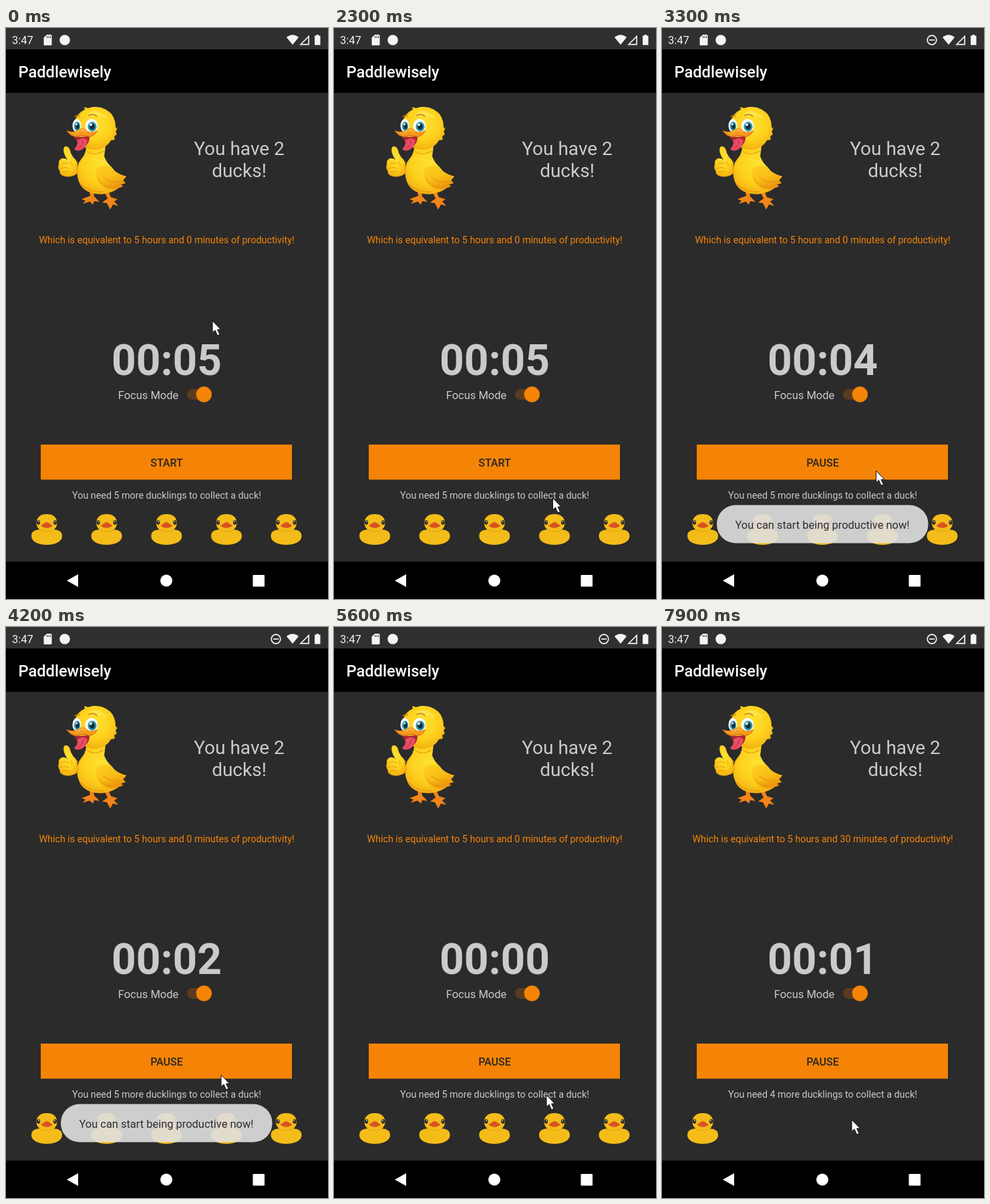
An HTML page for the animation above (8 s loop, 482 px wide and 854 px high).

```html
<!DOCTYPE html>
<html lang="en">
<head>
<meta charset="utf-8">
<title>Focus timer</title>
<style>
html, body { margin: 0; width: 100%; height: 100%; overflow: hidden; background: #2b2b2b; }
svg { display: block; width: 482px; height: 854px; font-family: Roboto, "Liberation Sans", sans-serif; }
.mid { text-anchor: middle; }
</style>
</head>
<body>
<svg viewBox="0 0 482 854">
  <defs>
    <radialGradient id="gold" cx=".5" cy=".38" r=".65">
      <stop offset="0" stop-color="#ffe234"/>
      <stop offset=".6" stop-color="#fdd01c"/>
      <stop offset="1" stop-color="#f4ac12"/>
    </radialGradient>
    <linearGradient id="wing" x1="0" y1="0" x2=".5" y2="1">
      <stop offset="0" stop-color="#fdd221"/>
      <stop offset=".6" stop-color="#f9bd16"/>
      <stop offset="1" stop-color="#ec930c"/>
    </linearGradient>
    <g id="duckling">
      <path fill="#f3bc19" d="M38 760C38 752 44 751 50 750Q45.500 746 45.500 740C46 731 52 727 61 727S76 731 76.500 740Q76.500 746 72 750C78 751 84 752 84 760C84 768 74 773 61 773S38 768 38 760Z"/>
      <path fill="none" stroke="#e3a816" d="M50 750.500Q61 756 72 750.500"/>
      <ellipse cx="48.500" cy="739.500" rx="2.600" ry="3.200" fill="#292522"/>
      <ellipse cx="73.500" cy="739.500" rx="2.600" ry="3.200" fill="#292522"/>
      <circle cx="49" cy="738.500" r=".9" fill="#ddd"/>
      <circle cx="73" cy="738.500" r=".9" fill="#ddd"/>
      <path fill="#df5822" d="M52 744Q56 742 58 740Q61 738 64 740Q66 742 70 744Q66 748 61 748T52 744Z"/>
      <path fill="none" stroke="#b8431c" stroke-width=".8" d="M54 744.500Q61 742.500 68 744.500"/>
    </g>
  </defs>

  <rect width="482" height="854" fill="#2b2b2b"/>
  <rect width="482" height="32" fill="#303030"/>
  <path d="M0 32H482V97H0ZM0 798H482V854H0Z"/>

  <!-- status bar -->
  <g fill="#f4f4f4">
    <text x="9" y="24" font-size="16.500">3:47</text>
    <path d="M61 10H67Q68.500 10 68.500 11.500V24.500Q68.500 26 67 26H58Q56.500 26 56.500 24.500V14.500Z"/>
    <path stroke="#303030" d="M61.500 12V15M64 12V15M66.500 12V15"/>
    <circle cx="88" cy="18" r="7.800"/>
    <path d="M420 14Q429 6.500 438 14L429 25Z"/>
    <path fill-rule="evenodd" d="M439 25.500L454 10.500V25.500ZM443 23.700H452.300V14.500Z"/>
    <path d="M464.500 10H468V11.500H470.500V25.500H462V11.500H464.500Z"/>
  </g>
  <g id="dnd" fill="none" stroke="#f4f4f4" stroke-width="1.700">
    <circle cx="404" cy="18" r="6.800"/>
    <path d="M400 18H408"/>
  </g>
  <text x="18.500" y="74" font-size="23.600" font-weight="500" fill="#fff">Paddlewisely</text>

  <!-- big duck -->
  <g stroke-linejoin="round" stroke-linecap="round">
    <path fill="#f28418" d="M125 244L126 251 113 256 119 258 115 263 125 259.500 130 264 132 259 140 260 132 252 131 245ZM147 245L152 255 144 261 151 262 156 271.500 160 264 168 266 162 259.500 167 256 157 253 153 243Z"/>
    <path fill="url(#gold)" d="M120 178Q120 188 112 197C104 207 105 225 113 237C121 247 138 251 152 247Q163 244 169 239L175 237 172 234 179 232 175 228 180 222 172 220Q164 217 159 209Q150 201 147 192L149 176Z"/>
    <path fill="url(#wing)" d="M137 209C145 204 155 206 160 211Q166 218 180 222L175 228 179 232 172 234 175 237 166 240Q149 244 140 232Q131 219 137 209Z"/>
    <path fill="none" stroke="#e8980f" stroke-width="1.200" d="M138 227Q146 238 162 237M146 223Q154 231 170 230M112 233Q124 246 146 245M122 185Q133 192 146 184"/>
    <path fill="url(#gold)" d="M118 122L117 118 123 120C136 115 151 120 159 130Q164 138 164 148L166.500 151 164 155 166 159 162 162 163 167 157 168C151 179 137 185 124 181Q110 176 106 163Q101 152 103 139Q107 127 118 122Z"/>
    <path fill="#fff275" opacity=".45" d="M124 126Q141 120 152 136Q142 130 127 133Z"/>
    <path fill="url(#gold)" d="M93 198C86 190 84 178 89 177Q95 176 97 187L101 194Q106 197 107 205L108 216Q101 224 88 222Q80 220 80.500 214Q77 209 79 204Q78 197 84 195Q89 194 93 198Z"/>
    <path fill="none" stroke="#e49a10" d="M83 203Q88 200 94 203M82 210Q88 207 94 210M84 216Q90 213 95 216M96 199Q100 202 99 206M107 200Q105 210 108 217"/>
    <path fill="#a92631" d="M101 161Q112 165 125 161Q126 170 119 177Q112 181 107 172Z"/>
    <path fill="#e84b62" d="M107 168Q115 162 122 168Q121 177 115 181Q107 186 102 181Q108 176 107 168Z"/>
    <path fill="none" stroke="#bd294b" d="M115 169Q115 175 109 180"/>
    <ellipse cx="106" cy="146" rx="6.500" ry="10" fill="#f7fbfa"/>
    <ellipse cx="128" cy="146.500" rx="9.500" ry="10.500" fill="#f7fbfa"/>
    <ellipse cx="106.500" cy="147" rx="4.500" ry="6.800" fill="#2992ab"/>
    <ellipse cx="129" cy="147.500" rx="6.500" ry="7.200" fill="#2992ab"/>
    <ellipse cx="107" cy="147" rx="2.500" ry="4.200" fill="#152c38"/>
    <ellipse cx="129" cy="147.500" rx="3.700" ry="4.600" fill="#152c38"/>
    <g fill="#fff"><circle cx="105.500" cy="144" r="1.500"/><circle cx="127" cy="144.500" r="1.900"/></g>
    <path fill="#f59a20" d="M91 153.500Q101 157 107 153Q114 147 120 152Q126 158 136 153Q136 160 126 163Q114 160 104 163Q95 161 91 153.500Z"/>
    <path fill="none" stroke="#d4660f" d="M91 154Q97 161 104 162.500Q114 159 126 162.500Q134 160 136 154"/>
    <path fill="none" stroke="#ffc257" stroke-width="1.500" d="M107 156Q113 150 119 155"/>
    <path fill="none" stroke="#b97a12" stroke-width="1.300" d="M103 133Q107 129 110 132M124 131Q130 127 136 132"/>
  </g>

  <g class="mid" fill="#cacaca">
    <g font-size="28"><text x="349" y="190">You have 2</text><text x="349" y="222.500">ducks!</text></g>
    <text id="total" x="240.500" y="321.500" font-size="14.300" fill="#f58406"></text>
    <text id="clock" x="240.500" y="519" font-size="64" font-weight="700"></text>
    <text x="213" y="554.500" font-size="16.500">Focus Mode</text>
    <text id="need" x="240.500" y="704" font-size="14.300"></text>
  </g>
  <rect x="271" y="540" width="34" height="16" rx="8" fill="#5b3b1e"/>
  <circle cx="296.300" cy="548" r="11.700" fill="#f58407"/>
  <rect x="52" y="623" width="376" height="52.500" fill="#f58406"/>
  <text id="button" class="mid" x="240.500" y="655.500" font-size="16" font-weight="500" fill="#292522"></text>

  <use href="#duckling"/>
  <g id="others">
    <use href="#duckling" x="89.600"/><use href="#duckling" x="179.300"/>
    <use href="#duckling" x="269"/><use href="#duckling" x="358.500"/>
  </g>
  <g id="toast">
    <rect x="82" y="713.500" width="316.500" height="57" rx="28" fill="#e0e0e0" opacity=".9"/>
    <text class="mid" x="240" y="749" font-size="16.450" fill="#2d2d2d">You can start being productive now!</text>
  </g>

  <g fill="#fff">
    <path d="M91 826.500L108 817V836Z"/>
    <circle cx="240" cy="826.500" r="9"/>
    <rect x="369.500" y="818" width="17.500" height="17.500" rx="1"/>
  </g>
  <path id="cursor" fill="#fff" stroke="#111" d="M0 0V17.500L4 14 7.500 22 11 20.500 7.500 13H12.500Z"/>
</svg>
<script>
const el = id => document.getElementById(id);
const show = (id, alpha) => el(id).setAttribute("opacity", +alpha);
const write = (id, text) => { if (el(id).textContent !== text) el(id).textContent = text; };

// time, x, y
const path = [
  [0, 309, 438], [800, 326, 740], [1100, 326, 740], [1400, 350, 805],
  [1600, 349, 814], [2000, 334, 742], [2600, 321, 664], [2900, 320, 660],
  [3800, 321, 665], [4200, 322, 670], [4700, 324, 684], [5600, 318, 700],
  [6500, 284, 737], [8000, 284, 737]
];

function cursorAt(t) {
  const i = path.findIndex(p => p[0] > t);
  const [t0, x0, y0] = path[i - 1], [t1, x1, y1] = path[i];
  const k = (t - t0) / (t1 - t0);
  return [x0 + (x1 - x0) * k, y0 + (y1 - y0) * k];
}

const START = 3100, DONE = 5700, AGAIN = 6000, TICK = 500;

function secondsAt(t) {
  if (t < START || (t >= DONE && t < AGAIN)) return 5;
  return Math.max(0, 4 - Math.floor((t - (t < DONE ? START : AGAIN)) / TICK));
}

function draw(now) {
  const t = Math.floor(now % 8000 / 100) * 100;
  const done = t >= DONE;
  write("clock", "00:0" + secondsAt(t));
  write("button", t < START ? "START" : "PAUSE");
  write("total", `Which is equivalent to 5 hours and ${done ? 30 : 0} minutes of productivity!`);
  write("need", `You need ${done ? 4 : 5} more ducklings to collect a duck!`);
  show("dnd", t >= START);
  show("others", !done);
  show("toast", Math.max(0, Math.min(1, (t - 3100) / 200, (4600 - t) / 200)));
  el("cursor").setAttribute("transform", `translate(${cursorAt(t)})`);
  requestAnimationFrame(draw);
}
draw(performance.now());
</script>
</body>
</html>
```
